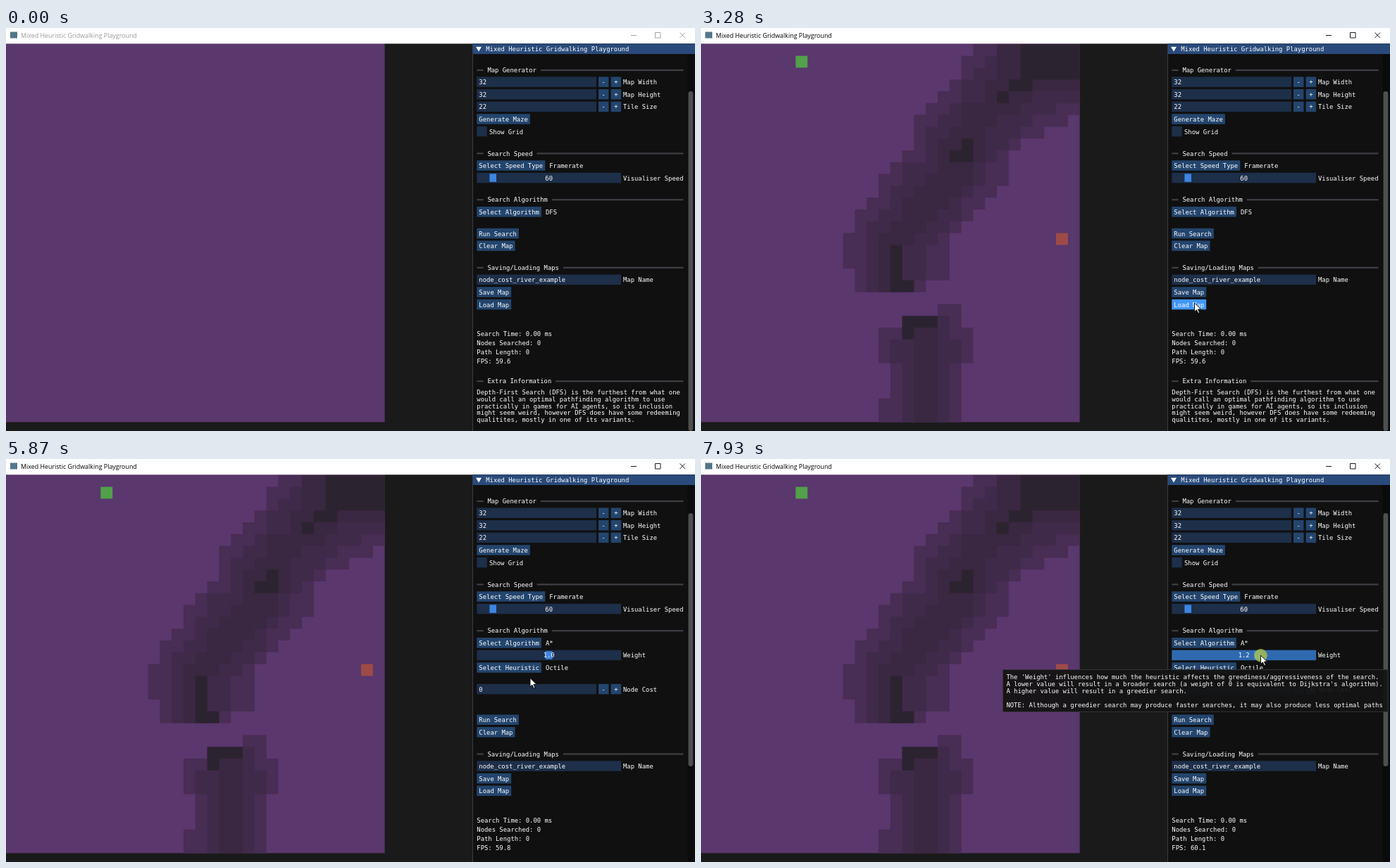
Write an HTML page with a canvas that moves like this. It is 978x573 px and loops after 8 s.

```html
<!DOCTYPE html>
<html lang="en">
<head>
<meta charset="utf-8">
<style>
html, body { margin: 0; width: 978px; height: 573px; overflow: hidden; background: #1a1a1a; }
canvas { display: block; }
</style>
</head>
<body>
<canvas id="stage" width="978" height="573"></canvas>
<script>
const ctx = document.getElementById('stage').getContext('2d');
const LOOP = 8000, CHAR = 5.345, TILE = 16.8, MAP_TOP = 22.8;
const APP = 'Mixed Heuristic Gridwalking Playground';
const MONO = '8.88px "DejaVu Sans Mono", monospace';
const LOAD = 3210, FOCUS = 3140, POPUP = 4700, PICK = 5720, TOOLTIP = 7040;
const PRESSES = [[3140, 3260], [4600, 4730], [5620, 5740], [7090, LOOP]];

// Time, x, y of the pointer tip.
const POINTER = [
  [70, 926, 493], [330, 906, 400], [600, 881, 305], [800, 881, 302], [1300, 862, 340],
  [1540, 836, 371], [1600, 812, 376], [2000, 754, 386], [2470, 700.6, 391], [3940, 700.6, 391],
  [4340, 730, 262], [4760, 730, 262], [5340, 742.5, 302], [5410, 742.5, 302], [5560, 744, 311],
  [6200, 744, 312], [6600, 747.4, 308.5], [6930, 766, 281], [7130, 777, 280], [7930, 794.5, 279.2], [LOOP, 794.5, 279.2]
];
const FPS = [[0, 59.6], [1540, 59.7], [3280, 59.6], [5400, 59.9], [6600, 59.7], [7130, 59.8], [7930, 60.1], [LOOP, 60.1]];

// River depth layers in tile units, shallow to deep.
const RIVER = [
  ['#482d54', 'M23 0V1H22V3H21V4H20V5H19V6H18V9H17V10H16V11H15V13H14V14H13V16H12V19H13V21H19V20H21V16H22V15H23V14H24V13H25V12H26V9H27V8H29V7H31V6H32V0ZM20 22V23H17V24H15V27H16V30H15V32H22V27H23V24H22V22Z'],
  ['#402a4a', 'M25 0V1H24V2H23V3H22V5H21V6H20V7H19V10H17V12H16V14H15V15H14V21H18V20H19V17H20V16H21V15H22V13H23V12H24V10H25V9H26V8H27V7H28V6H30V5H32V0ZM17 24V25H16V27H17V32H21V27H22V25H21V23H20V24Z'],
  ['#3a2741', 'M25 0V3H24V5H22V7H21V8H20V11H19V12H18V13H17V15H16V16H15V21H17V17H18V16H19V15H20V14H21V13H22V12H23V10H24V7H25V6H27V5H28V4H32V0ZM18 24V32H20V24Z'],
  ['#2c2330', 'M27 0V3H26V4H25V5H26V4H28V3H32V0ZM22 8V9H21V10H23V8ZM16 17V21H18V20H17V17ZM17 23V25H18V24H20V23Z']
].map(([color, d]) => [color, new Path2D(d)]);
const ARROW = new Path2D('M0 0V12.4L2.9 9.7 5.1 14.6 7 13.8 4.9 9 8.9 8.8Z');

const INFO = [
  'Depth-First Search (DFS) is the furthest from what one',
  'would call an optimal pathfinding algorithm to use',
  'practically in games for AI agents, so its inclusion',
  'might seem weird, however DFS does have some redeeming',
  'qualitites, mostly in one of its variants.'
];
const HINT = [
  "The 'Weight' influences how much the heuristic affects the greediness/aggressiveness of the search.",
  "A lower value will result in a broader search (a weight of 0 is equivalent to Dijkstra's algorithm).",
  'A higher value will result in a greedier search.',
  '',
  'NOTE: Although a greedier search may produce faster searches, it may also produce less optimal paths'
];

let mouse, pressed, blocked;

function sample(keys, t) {
  const i = keys.findIndex(k => k[0] > t);
  if (i < 1) return null;
  const a = keys[i - 1], b = keys[i], u = (t - a[0]) / (b[0] - a[0]);
  return a.slice(1).map((v, j) => v + (b[j + 1] - v) * u);
}

function rect(x, y, w, h, color) {
  ctx.fillStyle = color;
  ctx.fillRect(x, y, w, h);
}

function text(s, x, cy, color = '#fff') {
  ctx.font = MONO;
  ctx.fillStyle = color;
  ctx.fillText(s, x, cy + 3.1);
}

function lines(list, x, cy, step) {
  list.forEach((s, i) => text(s, x, cy + i * step));
}

function hovered(x, cy, w) {
  return mouse && !blocked && mouse[0] >= x && mouse[0] < x + w && Math.abs(mouse[1] - cy) < 7.3;
}

function frame(x, cy, w, color = '#1d2f49') {
  rect(x, cy - 7.6, w, 14.5, color);
}

function button(label, cy, x = 668.3, w = label.length * CHAR + 6.1) {
  const over = hovered(x, cy, w);
  frame(x, cy, w, over ? (pressed ? '#0f87fa' : '#4296fa') : '#23456d');
  text(label, x + (w - label.length * CHAR) / 2, cy);
}

function numberInput(value, label, cy) {
  frame(668.3, cy, 169.7);
  text(value, 671.3, cy);
  button('-', cy, 841, 14.5);
  button('+', cy, 858.6, 14.5);
  text(label, 876, cy);
}

function slider(value, label, cy, grabX, color) {
  frame(668.3, cy, 204.8, color);
  rect(grabX - 4.8, cy - 6.1, 9.6, 11.5, '#3d85e0');
  text(value, 770.7 - value.length * CHAR / 2, cy);
  text(label, 876, cy);
}

function heading(label, cy) {
  const end = 683.4 + label.length * CHAR + 6;
  rect(668.3, cy - 1.1, 9.4, 2.2, '#3f3f47');
  text(label, 683.4, cy);
  rect(end, cy - 1.1, 961.5 - end, 2.2, '#3f3f47');
}

function box(x, y, w, h) {
  rect(x, y, w, h, 'rgba(20,20,20,.94)');
  ctx.strokeStyle = '#3c3c44';
  ctx.lineWidth = 0.8;
  ctx.strokeRect(x + 0.4, y + 0.4, w - 0.8, h - 0.8);
}

function titleBar(active) {
  const ink = active ? '#000' : '#999';
  rect(0, 0, 978, 22.3, '#fff');
  rect(6, 5.5, 10, 9, '#53768a');
  ctx.font = '8.9px "Open Sans", sans-serif';
  ctx.fillStyle = ink;
  ctx.fillText(APP, 21, 14);
  ctx.strokeStyle = ink;
  ctx.lineWidth = 0.9;
  ctx.stroke(new Path2D('M887 10.5H895M921.5 6.5H929V14H921.5ZM956.5 6.5L964 14M964 6.5L956.5 14'));
}

function drawMap() {
  ctx.save();
  ctx.translate(0, MAP_TOP);
  ctx.scale(TILE, TILE);
  for (const [color, path] of RIVER) {
    ctx.fillStyle = color;
    ctx.fill(path);
  }
  rect(8, 1, 1, 1, '#52a04a');
  rect(30, 16, 1, 1, '#9e4b48');
  ctx.restore();
}

function panel(t) {
  const aStar = t >= PICK, drop = aStar ? 78.7 : 0;
  rect(662, 22.3, 316, 551, '#101010');
  rect(662, 22.3, 0.9, 551, '#40404a');
  rect(662.5, 22.3, 315.5, 14.7, '#294a7a');
  ctx.fillStyle = '#fff';
  ctx.fill(new Path2D('M667 26.8H675L671 33.4Z'));
  text(APP, 681.2, 30);

  rect(967.5, 37, 10, 536, '#0b0b0b');
  ctx.fillStyle = '#4f4f4f';
  ctx.beginPath();
  ctx.roundRect(968.5, aStar ? 77 : 90, 6.8, aStar ? 360 : 483, 3.4);
  ctx.fill();

  heading('Map Generator', 60);
  numberInput('32', 'Map Width', 77);
  numberInput('32', 'Map Height', 94.6);
  numberInput('22', 'Tile Size', 112.2);
  button('Generate Maze', 129.8);
  frame(668.3, 147.4, 14.5);
  text('Show Grid', 686, 147.6);

  heading('Search Speed', 178.4);
  button('Select Speed Type', 195.9);
  text('Framerate', 771.2, 195.9);
  slider('60', 'Visualiser Speed', 213.4, 691.2);

  heading('Search Algorithm', 244.2);
  button('Select Algorithm', 261.7);
  text(aStar ? 'A*' : 'DFS', 766, 261.7);
  if (aStar) {
    const step = t < TOOLTIP || mouse[0] < 781 ? 0 : mouse[0] < 790 ? 1 : 2;
    const color = hovered(668.3, 279.3, 204.8) ? (pressed ? '#2f6ab0' : '#23456d') : undefined;
    slider('1.' + step, 'Weight', 279.3, 770.6 + step * 9.6, color);
    button('Select Heuristic', 296.9);
    text('Octile', 766, 296.9);
    numberInput('0', 'Node Cost', 327.5);
  }
  button('Run Search', 292.4 + drop);
  button('Clear Map', 310 + drop);

  heading('Saving/Loading Maps', 340.8 + drop);
  frame(668.3, 358.2 + drop, 204.8);
  text('node_cost_river_example', 671.3, 358.2 + drop);
  text('Map Name', 876, 358.2 + drop);
  button('Save Map', 375.8 + drop);
  button('Load Map', 393.4 + drop);

  lines(['Search Time: 0.00 ms', 'Nodes Searched: 0', 'Path Length: 0',
    'FPS: ' + sample(FPS, t)[0].toFixed(1)], 668.3, 435 + drop, 13);
  heading('Extra Information', 502.2 + drop);
  lines(INFO, 668.3, 517.6 + drop, 9.93);
}

function popup() {
  box(730, 262, 54.5, 59.5);
  ['DFS', 'BFS', 'Dijkstra', 'A*'].forEach((name, i) => {
    const cy = 272.5 + i * 13;
    if (mouse[0] > 732 && Math.abs(mouse[1] + 0.6 - cy) < 6.5) rect(732, cy - 6.5, 46, 13, '#3a80d6');
    text(name, 735.7, cy);
  });
}

function tooltip() {
  const top = mouse[1] + 20;
  box(428, top, 547.5, 60.5);
  lines(HINT, 433.4, top + 10.8, 9.93);
}

function pointer(t) {
  const [x, y] = mouse;
  if (pressed) {
    ctx.fillStyle = 'rgba(172,194,72,.8)';
    ctx.beginPath();
    ctx.arc(x, y, 9.2, 0, 7);
    ctx.fill();
  }
  ctx.save();
  ctx.translate(x, y);
  if (t > 1380 && t < 1600) {
    const beam = new Path2D('M-2.5 -6.5H2.5M0 -6.5V6.5M-2.5 6.5H2.5');
    ctx.strokeStyle = '#000';
    ctx.lineWidth = 2.6;
    ctx.stroke(beam);
    ctx.strokeStyle = '#fff';
    ctx.lineWidth = 1.2;
    ctx.stroke(beam);
  } else {
    ctx.fillStyle = '#fff';
    ctx.fill(ARROW);
    ctx.strokeStyle = '#000';
    ctx.lineWidth = 0.9;
    ctx.stroke(ARROW);
  }
  ctx.restore();
}

function draw(t) {
  mouse = sample(POINTER, t);
  pressed = PRESSES.some(([from, to]) => t >= from && t < to);
  blocked = t >= POPUP && t < PICK;
  rect(0, 0, 978, 573, '#1a1a1a');
  rect(0, 22, 32 * TILE, MAP_TOP - 22 + 32 * TILE, '#5a376d');
  if (t >= LOAD) drawMap();
  titleBar(t >= FOCUS);
  panel(t);
  if (blocked) popup();
  if (t >= TOOLTIP) tooltip();
  if (mouse) pointer(t);
}

function tick() {
  draw(performance.now() % LOOP);
  requestAnimationFrame(tick);
}
tick();
</script>
</body>
</html>
```
